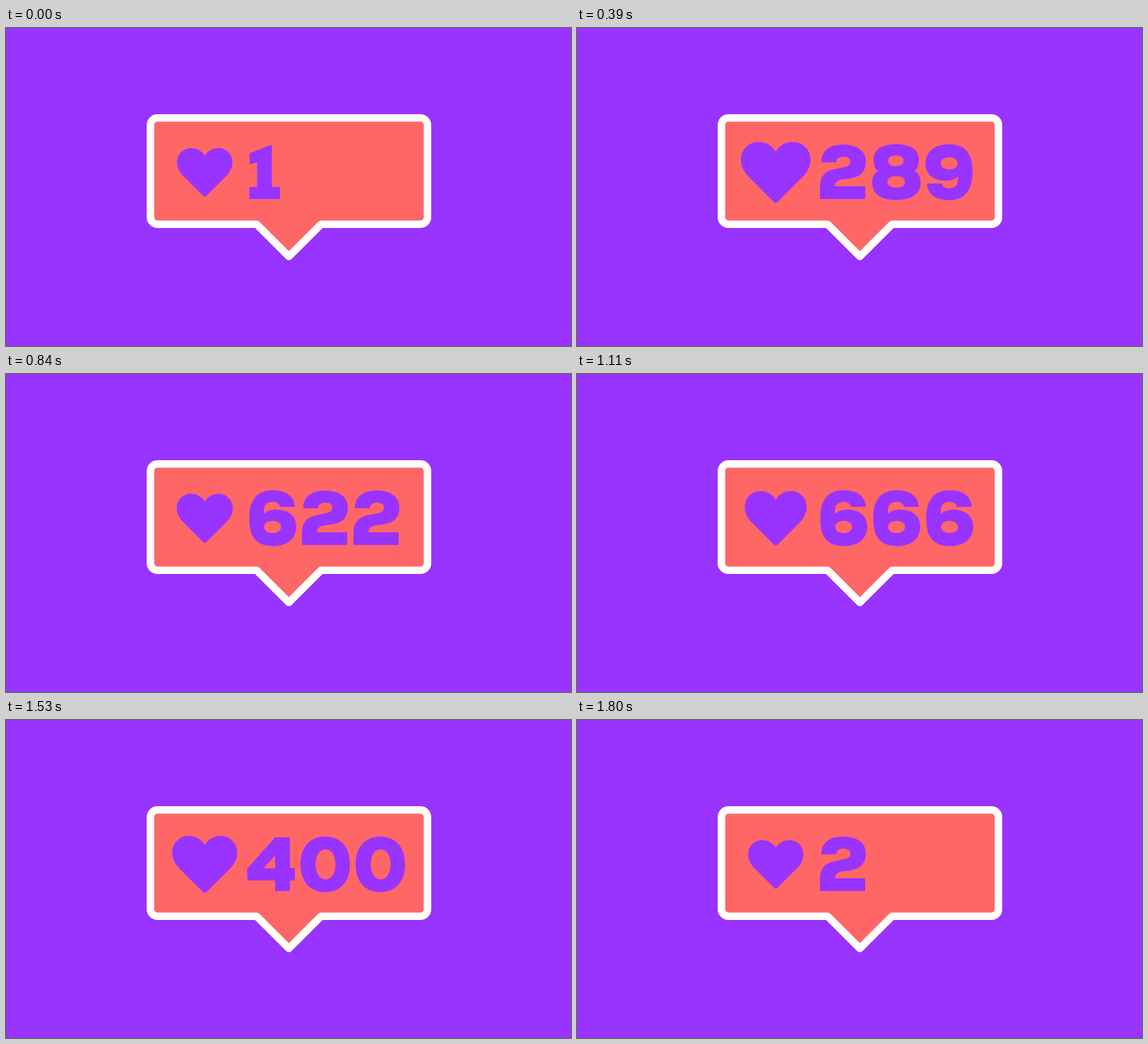
Write an HTML page with a canvas that moves like this. It is 800x450 px and loops after 1.83 s.

```html
<!DOCTYPE html>
<html lang="en">
<head>
<meta charset="utf-8">
<title>Like counter</title>
<style>
html, body { margin: 0; width: 100%; height: 100%; overflow: hidden; background: #9933ff; }
canvas { display: block; width: 800px; height: 450px; }
</style>
</head>
<body>
<canvas id="stage" width="800" height="450" role="img" aria-label="Like counter"></canvas>
<script>
const ctx = document.getElementById('stage').getContext('2d');
const PURPLE = '#9933ff', CORAL = '#ff6666';
const STEP = 30, STEPS = 61;

// Closed oval; k sets how square its shoulders are.
function oval(cx, cy, rx, ry, k = 0.6) {
  const p = new Path2D(), a = rx * k, b = ry * k;
  p.moveTo(cx, cy - ry);
  p.bezierCurveTo(cx + a, cy - ry, cx + rx, cy - b, cx + rx, cy);
  p.bezierCurveTo(cx + rx, cy + b, cx + a, cy + ry, cx, cy + ry);
  p.bezierCurveTo(cx - a, cy + ry, cx - rx, cy + b, cx - rx, cy);
  p.bezierCurveTo(cx - rx, cy - b, cx - a, cy - ry, cx, cy - ry);
  p.closePath();
  return p;
}

function glyph(advance, outline, ...holes) {
  const path = new Path2D(outline);
  holes.forEach(h => path.addPath(h));
  return { advance, path };
}

const zero = glyph(78, oval(39, 39.2, 35, 39.2, 0.62), oval(39.5, 39.2, 14, 21.3));

const one = glyph(53, 'M5 12L36.5 0V60H48V77H4.5V60H15.5V25L5 28Z');

const two = glyph(73, `M6 25C6 8 18 0 37 0C57 0 69 9 69 24C69 39 60 45 50 47
  C46 48 42 48.5 37 49C29 50 25 53 25 59H68V77H4V60C4 46 10 38 24 35
  L38 32C45 31 47 28 47 24C47 19 43 17 37 17C31 17 27 20 27 25Z`);

const three = glyph(74, `M4 23C6 8 18 -.5 38 -.5C57 -.5 68 7 68 20C68 29 63 35 56 37
  C65 40 70 46 70 55C70 70 58 78.5 38 78.5C17 78.5 4 70 3 54H25
  C26 59 30 61.5 37 61.5C44 61.5 48 59 48 54C48 49 44 46.5 38 46.5H27V30.5H37
  C43 30.5 46 28 46 23.5C46 19 43 16.5 37 16.5C31 16.5 27 18.5 26 23Z`);

const four = glyph(73, 'M41 1H62V44.5H69V62H62V77H41V62H2L1 46Z',
  new Path2D('M41 26.5V45H24.5Z'));

const five = glyph(74, `M9 1H65V18H28L27 28C31 26 36 25 42 25C59 25 70 34 70 50
  C70 68 58 78.5 37 78.5C17 78.5 5 70 4 55H26C27 59 31 61.5 37 61.5
  C44 61.5 48 58 48 51.5C48 45 44 42 38 42C33 42 29 43 27 46H6Z`);

const six = glyph(75, `M69 23H48C47 18 43 16 38 16C29 16 25 20 25 30V33
  C29 29 35 27 43 27C60 27 71 36 71 51C71 68 58 78.5 38 78.5
  C16 78.5 4.5 67 4.5 40C4.5 12 16 -.5 38 -.5C57 -.5 68 8 69 23Z`,
  oval(37.5, 51.5, 12, 8.7));

const seven = glyph(67, 'M4 1H65V15C52 30 44 50 42 77H19C21 53 29 33 42 19H4Z');

const eight = glyph(76.5, `M39 -.5C59 -.5 71 7 71 21C71 29 69 34 65 37.5
  C71 41 73.5 47 73.5 54C73.5 70 60 78.5 39 78.5C18 78.5 5 70 5 54
  C5 47 7 41 13 37.5C9 34 7 29 7 21C7 7 19 -.5 39 -.5Z`,
  oval(38.5, 23, 11, 7.7), oval(39, 52.7, 12.5, 8.2));

// Nine is six turned upside down.
const nine = { advance: 75, path: new Path2D() };
nine.path.addPath(six.path, new DOMMatrix([-1, 0, 0, -1, 75, 78]));

const digits = [zero, one, two, three, four, five, six, seven, eight, nine];

const heart = new Path2D(`M0 -23.5C-4 -30.5 -11 -34.5 -19.5 -34.5
  C-30.5 -34.5 -39.2 -25.5 -39.2 -14.5C-39.2 -7.5 -36 -1 -31 4.2
  L-1.8 33.4Q0 35 1.8 33.4L31 4.2C36 -1 39.2 -7.5 39.2 -14.5
  C39.2 -25.5 30.5 -34.5 19.5 -34.5C11 -34.5 4 -30.5 0 -23.5Z`);

function bubblePath() {
  const l = 204.5, r = 596.8, t = 127.2, b = 277.7, rad = 10;
  const p = new Path2D();
  p.moveTo(l + rad, t);
  p.arcTo(r, t, r, b, rad);
  p.arcTo(r, b, l, b, rad);
  p.lineTo(446.1, b);
  p.lineTo(400.5, 323.2);
  p.lineTo(354.9, b);
  p.arcTo(l, b, l, t, rad);
  p.arcTo(l, t, r, t, rad);
  p.closePath();
  return p;
}
const bubble = bubblePath();

function countAt(k) {
  return k < 45
    ? Math.min(666, Math.floor(1 + 22.2 * k + 1e-6))
    : Math.round(666 - 664 * (k - 45) / 15);
}

function beatAt(k) {
  return 1 + 0.268 * (1 - Math.cos(Math.PI * k / 15)) / 2;
}

function drawHeart(scale) {
  ctx.save();
  ctx.translate(281.4, 204.5);
  ctx.scale(scale, scale);
  ctx.fill(heart);
  ctx.restore();
}

function drawNumber(n) {
  ctx.save();
  ctx.translate(340, 165);
  for (const c of String(n)) {
    const g = digits[c];
    ctx.fill(g.path, 'evenodd');
    ctx.translate(g.advance, 0);
  }
  ctx.restore();
}

function draw(ms) {
  const k = Math.floor(ms / STEP + 1e-6) % STEPS;
  ctx.fillStyle = PURPLE;
  ctx.fillRect(0, 0, 800, 450);
  ctx.fillStyle = CORAL;
  ctx.fill(bubble);
  ctx.strokeStyle = '#fff';
  ctx.lineWidth = 10.6;
  ctx.lineJoin = 'round';
  ctx.stroke(bubble);
  ctx.fillStyle = PURPLE;
  drawHeart(beatAt(k));
  drawNumber(countAt(k));
}

let start;
function tick(now) {
  start ??= now;
  draw(now - start);
  requestAnimationFrame(tick);
}
draw(0);
requestAnimationFrame(tick);
</script>
</body>
</html>
```
